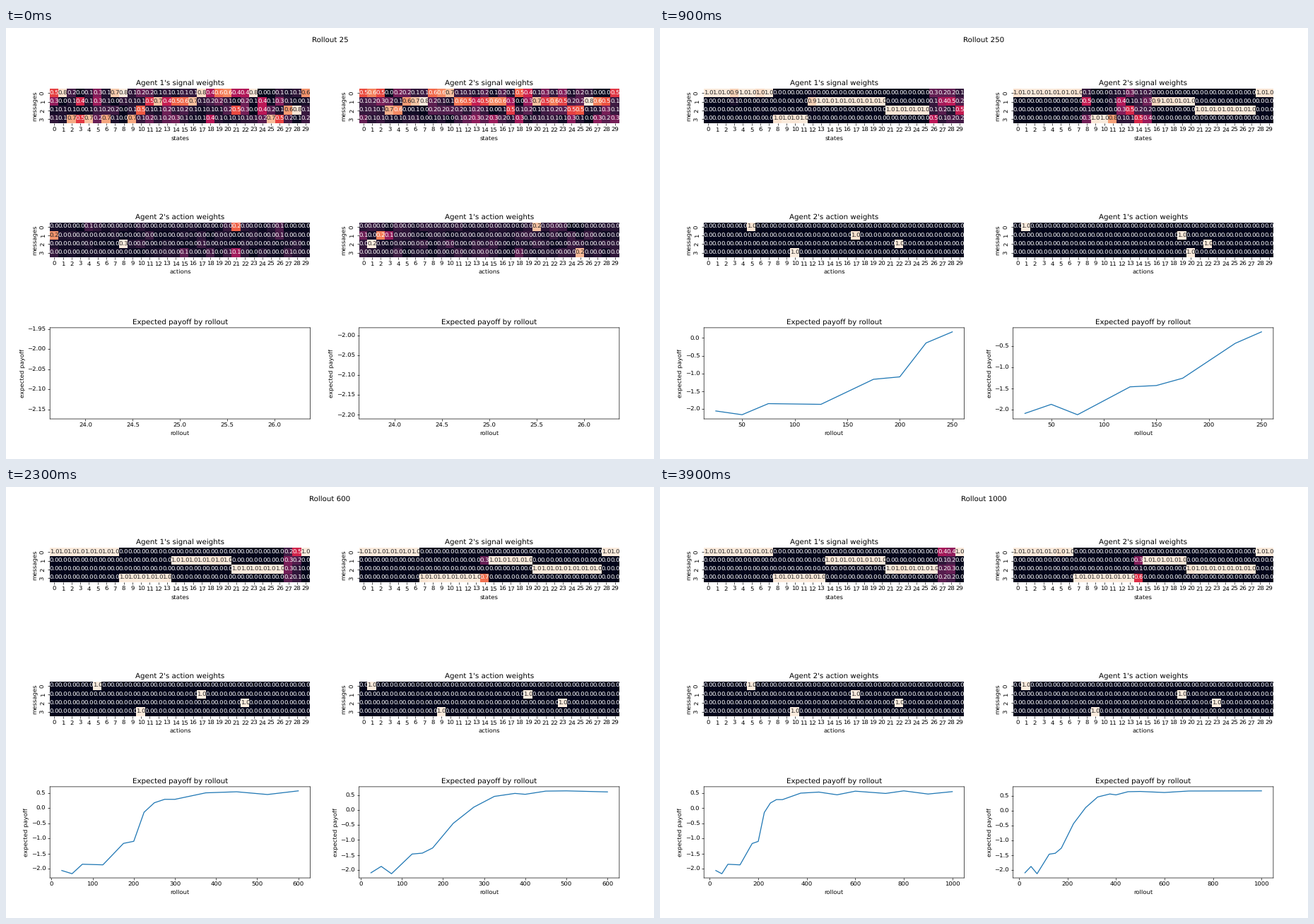
Recreate the animation shown at these times as a matplotlib script. Size 917 by 611 pixels, loop 4000 ms.

```python
import numpy as np
import matplotlib.pyplot as plt
from matplotlib.animation import FuncAnimation
from matplotlib.colors import LinearSegmentedColormap

W, H, DPI = 917, 611, 61.125
FRAMES, STEP = 40, 25
MESSAGES, STATES = 4, 30
LEFT, RIGHT, PANEL_W = 62.2, 499.7, 368.2
CELL = PANEL_W / STATES

ROCKET = LinearSegmentedColormap.from_list("ember", [
    "#03051a", "#221331", "#451c47", "#691f55", "#921c5b", "#b91657",
    "#d92847", "#ed503e", "#f47d57", "#f6a47c", "#f7c9aa", "#faebdd"])

# Learning stages: rollout, sharpness of the choice, noise.
SIGNAL_STAGES = [(25, 1.7, .7), (150, 3.2, .8), (250, 6, .7),
                 (450, 6, .5), (600, 6, .5), (800, 6, .5), (1000, 6, .5)]
ACTION_STAGES = [(25, 2, .45), (150, 4, .8), (250, 7.5, .6), (375, 12, .3)]

# Per stage, the bands of states that share a message: (message, first, last).
# The last entry holds for all later stages.
BANDS_1 = [
    [(0, 0, 1), (3, 2, 6), (0, 7, 8), (3, 9, 9), (1, 11, 16), (0, 17, 21),
     (2, 21, 22), (0, 23, 23), (3, 25, 26), (2, 27, 28), (0, 29, 29)],
    [(0, 0, 2), (3, 3, 3), (1, 4, 4), (0, 5, 11), (2, 12, 14), (3, 15, 15), (1, 16, 18),
     (0, 19, 19), (2, 21, 21), (3, 23, 25), (1, 26, 26), (0, 27, 29)],
    [(0, 0, 7), (3, 8, 11), (1, 12.4, 20), (2, 21, 25)],
    [(0, 0, 7), (3, 8, 13), (1, 14, 20), (2, 21, 26), (0, 28.8, 29)],
]
BANDS_2 = [
    [(0, 0, 2), (2, 3, 4), (1, 5, 8), (0, 8, 10), (1, 12, 16), (0, 18, 19),
     (1, 20, 22), (2, 24, 26), (1, 26, 28), (0, 29, 29)],
    [(3, 0, 3), (0, 4, 9), (3, 10, 11), (1, 12, 13), (2, 14, 16), (2, 19, 19),
     (1, 20, 21), (1, 24, 24), (2, 25, 27), (1, 28, 29)],
    [(0, 0, 7), (3, 9, 10.5), (1, 16, 20), (2, 21, 27), (0, 28, 29)],
    [(0, 0, 6), (3, 7, 13.5), (1, 14.5, 19), (2, 20, 27), (0, 28, 29)],
]

# Per stage, the preferred action for each message.
PEAKS_1 = [(20, 2, 1, 25), (5, 19, 23, 11), (1, 19, 22, 20), (1, 19, 23, 9)]
PEAKS_2 = [(21, 0, 8, 21), (6, 17, 22, 22), (5, 17, 22, 10), (5, 17, 22, 10)]

# Turning points of the payoff curves: (rollout, payoff).
PAYOFF_1 = [(25, -2.06), (50, -2.166), (75, -1.853), (125, -1.873), (175, -1.166),
            (200, -1.097), (225, -.14), (250, .173), (275, .286), (300, .286), (375, .5),
            (450, .535), (525, .445), (600, .565), (725, .49), (800, .575),
            (900, .47), (1000, .55)]
PAYOFF_2 = [(25, -2.095), (50, -1.881), (75, -2.126), (125, -1.468), (150, -1.437),
            (175, -1.265), (225, -.442), (275, .1), (325, .46), (375, .56), (400, .53),
            (450, .637), (500, .645), (600, .61), (700, .66), (1000, .665)]


def softmax(scores, axis):
    e = np.exp(scores)
    return e / e.sum(axis=axis, keepdims=True)


def signal_grid(bands, sharp, noise):
    """Each state prefers the message whose band it lies in, softly at the edges."""
    states = np.arange(STATES)
    gap = np.ones((MESSAGES, STATES))
    for message, first, last in bands:
        outside = np.maximum(np.maximum(first - states, states - last), 0)
        gap[message] = np.minimum(gap[message], outside)
    return softmax(noise - sharp * gap, axis=0)


def action_grid(peaks, sharp, noise):
    """Each message prefers one action."""
    distance = np.arange(STATES) - np.array(peaks)[:, None]
    return softmax(noise + sharp * np.exp(-2 * distance ** 2), axis=1)


def stage_grids(make, targets, stages, seed):
    rng = np.random.default_rng(seed)
    return [make(targets[min(i, len(targets) - 1)], sharp,
                 noise * rng.standard_normal((MESSAGES, STATES)))
            for i, (_, sharp, noise) in enumerate(stages)]


def luminance(rgba):
    rgb = rgba[:, :3]
    lin = np.where(rgb <= .03928, rgb / 12.92, ((rgb + .055) / 1.055) ** 2.4)
    return lin @ [.2126, .7152, .0722]


def add_axes(x, top, height):
    return fig.add_axes([x / W, 1 - (top + height) / H, PANEL_W / W, height / H])


class Heatmap:
    def __init__(self, x, top, title, xlabel, stages, grids):
        self.times = [stage[0] for stage in stages]
        self.grids = grids
        ax = add_axes(x, top, CELL * MESSAGES)
        self.mesh = ax.pcolormesh(grids[0], cmap=ROCKET)
        ax.set(xlim=(0, STATES), ylim=(MESSAGES, 0), title=title,
               xlabel=xlabel, ylabel="messages")
        ax.set_xticks(np.arange(STATES) + .5, range(STATES))
        ax.set_yticks(np.arange(MESSAGES) + .5, range(MESSAGES), rotation=90, va="center")
        ax.spines[:].set_visible(False)
        self.labels = [ax.text(c + .5, r + .5, "", ha="center", va="center")
                       for r in range(MESSAGES) for c in range(STATES)]

    def grid_at(self, rollout):
        place = np.interp(rollout, self.times, range(len(self.times)))
        i = min(int(place), len(self.times) - 2)
        u = place - i
        return self.grids[i] * (1 - u) + self.grids[i + 1] * u

    def show(self, rollout):
        grid = self.grid_at(rollout)
        self.mesh.set_array(grid)
        self.mesh.set_clim(grid.min(), grid.max())
        values = grid.ravel()
        light = luminance(self.mesh.to_rgba(values)) > .408
        for label, value, dark_text in zip(self.labels, values, light):
            label.set_text(f"{value:.1f}")
            label.set_color(".15" if dark_text else "w")


class Payoff:
    def __init__(self, x, points):
        self.rollouts = STEP * np.arange(1, FRAMES + 1)
        self.values = np.interp(self.rollouts, *zip(*points))
        self.ax = add_axes(x, 424.9, 129.2)
        self.ax.set(title="Expected payoff by rollout", xlabel="rollout",
                    ylabel="expected payoff")
        self.line, = self.ax.plot([], [], color="#1f77b4")

    def show(self, rollout):
        n = rollout // STEP
        self.line.set_data(self.rollouts[:n], self.values[:n])
        self.ax.relim()
        self.ax.autoscale_view()


# Unhinted text and unsnapped lines keep sub-pixel positions.
plt.rcParams.update({"font.family": "DejaVu Sans", "text.hinting": "none",
                     "path.snap": False})
# The tiny surplus keeps the pixel size from rounding down.
fig = plt.figure(figsize=((W + 1e-6) / DPI, (H + 1e-6) / DPI), dpi=DPI, facecolor="white")
heading = fig.suptitle("")


def signals(x, agent, bands):
    grids = stage_grids(signal_grid, bands, SIGNAL_STAGES, agent)
    return Heatmap(x, 86.2, f"Agent {agent}'s signal weights", "states",
                   SIGNAL_STAGES, grids)


def actions(x, agent, peaks):
    grids = stage_grids(action_grid, peaks, ACTION_STAGES, agent)
    return Heatmap(x, 275.8, f"Agent {agent}'s action weights", "actions",
                   ACTION_STAGES, grids)


panels = [signals(LEFT, 1, BANDS_1), signals(RIGHT, 2, BANDS_2),
          actions(LEFT, 2, PEAKS_2), actions(RIGHT, 1, PEAKS_1),
          Payoff(LEFT, PAYOFF_1), Payoff(RIGHT, PAYOFF_2)]


def update(frame):
    rollout = STEP * (frame + 1)
    heading.set_text(f"Rollout {rollout}")
    for panel in panels:
        panel.show(rollout)


anim = FuncAnimation(fig, update, frames=FRAMES, interval=100, init_func=lambda: update(0),
                     repeat=True, repeat_delay=0, blit=False)
plt.show()
```
